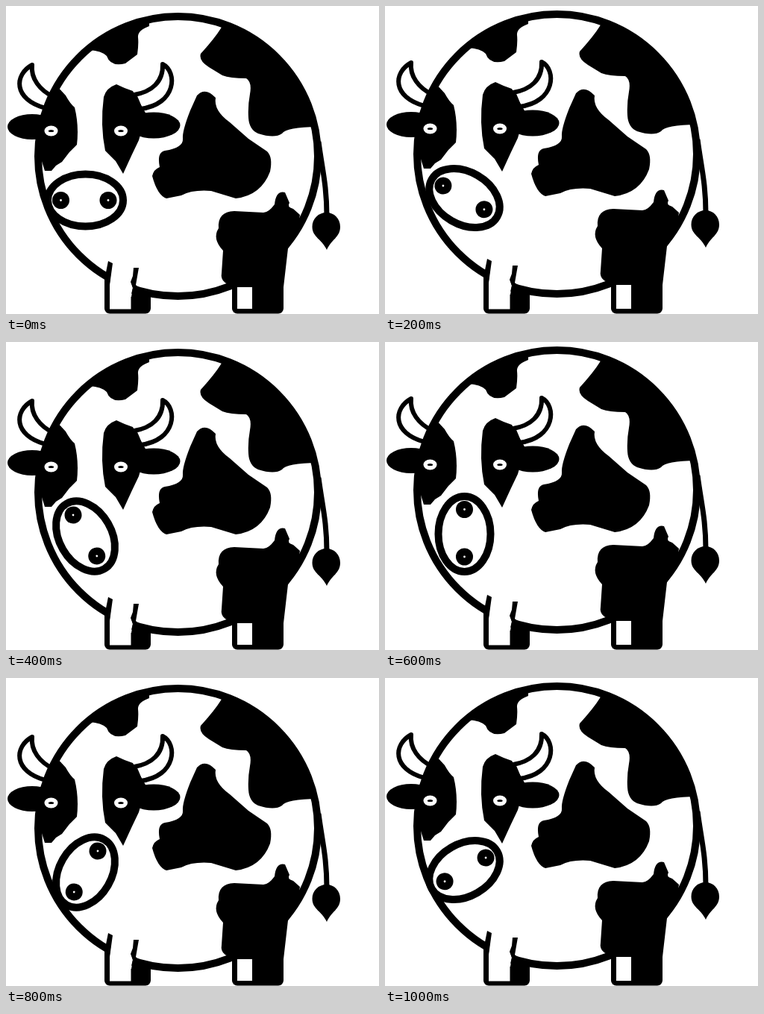
These frames come from a looping animation (500 px wide and 413 px high, 1200 ms). An HTML page with a canvas:

```html
<!DOCTYPE html>
<html lang="en">
<head>
<meta charset="utf-8">
<title>Cow</title>
<style>
html, body { margin: 0; width: 100%; height: 100%; overflow: hidden; background: #fff; }
canvas { display: block; }
</style>
</head>
<body>
<canvas id="stage" width="500" height="413"></canvas>
<script>
const ctx = document.getElementById('stage').getContext('2d');
const STEP = 200, STEPS = 6, BOB = -3;
const BLACK = '#000', WHITE = '#fff';
const shape = d => new Path2D(d);

// Patches that run off the edge of the body and are clipped to it.
const edgePatches = shape(
  'M192 10 V27 Q176 33 177 42 T176 65 L160 77 Q140 82 135 67 Q128 60 112 59 L90 10Z' +
  'M293 20 L288 30 Q280 43 261 64 Q258 73 272 82 L290 93 Q300 97 322 97 ' +
  'Q330 102 327 118 T325 150 Q326 166 338 171 Q360 178 370 171 Q376 162 425 162 V0Z' +
  'M68 107 L80 120 Q86 131 92 136 Q98 160 95 186 L85 196 L75 209 L67 214 ' +
  'L61 221 H52 L47 205 L30 200 V107Z');
const bellyPatch = shape(
  'M256 120 Q267 108 281 123 Q278 140 300 156 L325 178 L350 195 Q358 203 354 222 ' +
  'Q342 254 308 258 L275 248 Q250 246 235 254 L215 258 Q203 254 196 228 ' +
  'Q198 219 206 216 Q202 196 213 194 Q238 190 237 178 Q236 168 247 140Z');
const hindPatch = shape(
  'M372 377 L312 376 Q286 374 289 358 L291 328 Q276 312 285 298 Q283 276 306 275 ' +
  'L345 277 Q352 277 360 266 Q362 247 374 250 L380 264 Q376 269 385 272 ' +
  'L394 280 L390 305 L378 325Z');
const eyePatch = shape(
  'M148 105 Q158 110 170 114 L188 145 L178 180 L168 201 L157 225 L147 208 ' +
  'L133 194 Q126 160 131 122 Q134 110 148 105Z');

const leftHorn = shape('M35 79 C11 92 9 125 53 137 L64 122 C45 113 33 97 35 79Z');
const rightHorn = shape('M210 78 C230 88 229 132 180 138 L172 119 C195 115 211 102 210 78Z');
const tail = shape('M419 182 C424 220 430 240 430 282');
const tuft = shape(
  'M429.5 277 C440 277 448 285 448 296 C448 310 437 312 430 327 ' +
  'C423 312 410.5 310 410.5 296 C410.5 285 419 277 429.5 277Z');
const frontLeg = shape('M142 345 L139 372 V390 H168 L170 378 L167 368 L172 351Z');
const legLines = shape(
  'M137 342 L143 345 L139 374 H132 L133 362Z' +
  'M171 351 H178 L174 374 L180 380 L168 386 L170 378 L167 370 L170 362Z');

function fill(path, color = BLACK) {
  ctx.fillStyle = color;
  ctx.fill(path);
}

function stroke(path, width) {
  ctx.lineWidth = width;
  ctx.stroke(path);
}

function ellipse(x, y, rx, ry, color = BLACK, line = 0) {
  const path = new Path2D();
  path.ellipse(x, y, rx, ry, 0, 0, 2 * Math.PI);
  fill(path, color);
  if (line) stroke(path, line);
  return path;
}

function foot(x, w) {
  const path = new Path2D();
  path.roundRect(x, 355, w, 57.5, 7);
  fill(path);
}

function horn(path) {
  fill(path, WHITE);
  stroke(path, 6);
}

function body() {
  const disc = ellipse(230.5, 201.5, 187.5, 187.5, WHITE, 10);
  ctx.save();
  ctx.clip(disc);
  fill(edgePatches);
  ctx.restore();
  fill(bellyPatch);
  fill(hindPatch);
}

function eye(x) {
  ellipse(x, 167.5, 9, 7, WHITE);
  ellipse(x, 167.5, 3.7, 1.6);
}

function muzzle(angle) {
  ctx.save();
  ctx.translate(106.5, 260.5);
  ctx.rotate(angle);
  ellipse(0, 0, 50.5, 35, WHITE, 10);
  for (const x of [-33, 30.5]) {
    ellipse(x, 0, 11.5, 11.5);
    ellipse(x, 0, 1.4, 1.4, WHITE);
  }
  ctx.restore();
}

function draw(step) {
  const dy = step % 2 ? BOB : 0;
  ctx.fillStyle = WHITE;
  ctx.fillRect(0, 0, 500, 413);
  ctx.strokeStyle = BLACK;
  ctx.lineJoin = 'round';

  foot(132, 62);
  foot(303, 69);

  ctx.save();
  ctx.translate(0, dy);
  horn(leftHorn);
  ellipse(35, 162, 33, 17);
  stroke(tail, 7);
  fill(tuft);
  body();
  horn(rightHorn);
  ellipse(198, 160, 35.5, 17.5);
  fill(eyePatch);
  eye(60.5);
  eye(154);
  fill(frontLeg, WHITE);
  fill(legLines);
  muzzle(step * Math.PI / STEPS);
  ctx.restore();

  // lower legs stay planted
  ctx.fillStyle = WHITE;
  ctx.fillRect(139, 374 + dy, 28.5, 32.5 - dy);
  ctx.fillRect(310, 377 + dy, 20, 29 - dy);
}

function tick() {
  draw(Math.floor(performance.now() / STEP) % STEPS);
  requestAnimationFrame(tick);
}
tick();
</script>
</body>
</html>
```
